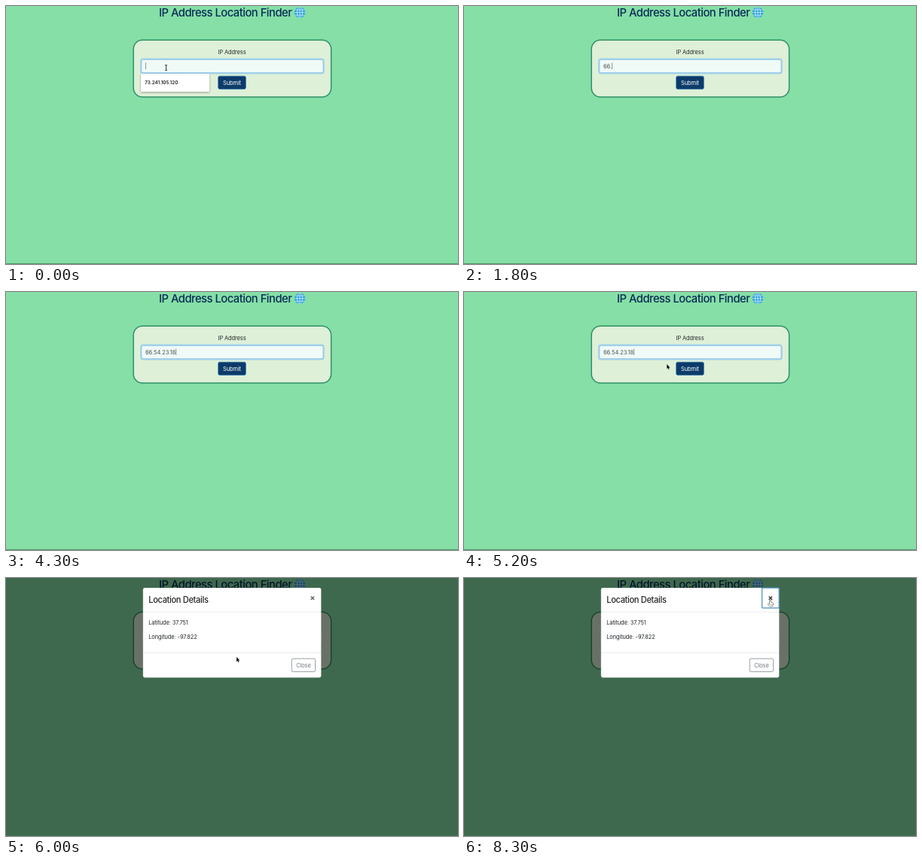
An HTML page with a canvas for the animation above (8400 ms loop, 600 px wide and 343 px high).

```html
<!DOCTYPE html>
<html lang="en">
<head>
<meta charset="utf-8">
<title>IP Address Location Finder</title>
<style>
  html, body { margin: 0; width: 100%; height: 100%; overflow: hidden; background: #85dfa6; }
  canvas { display: block; width: 600px; height: 343px; }
</style>
</head>
<body>
<canvas id="stage"></canvas>
<script>
const W = 600, H = 343, LOOP = 8400, STEP = 100;
const canvas = document.getElementById('stage');
const ctx = canvas.getContext('2d');
const ratio = window.devicePixelRatio || 1;
canvas.width = Math.round(W * ratio);
canvas.height = Math.round(H * ratio);

const TYPED = '66.54.23.18';
const KEY_TIMES = [1200, 1400, 1700, 2800, 2900, 3100, 3300, 3500, 3700, 3900, 4100];
const MOUSE_BACK = 4800, PRESS = 5800, OPEN = 6000, CLOSE_PRESS = 8100;

// Mouse waypoints: time, x, y
const PATH = [
  [0, 212.5, 82], [MOUSE_BACK, 212.5, 82], [5500, 306, 105],
  [7000, 306, 105], [7800, 406.5, 29.5]
];

function mouseAt(t) {
  for (let i = 1; i < PATH.length; i++) {
    const [t0, x0, y0] = PATH[i - 1], [t1, x1, y1] = PATH[i];
    if (t < t1) {
      const p = (t - t0) / (t1 - t0), e = p * p * (3 - 2 * p);
      return { x: x0 + (x1 - x0) * e, y: y0 + (y1 - y0) * e };
    }
  }
  const [, x, y] = PATH[PATH.length - 1];
  return { x, y };
}

function box(x, y, w, h, r, fill, stroke, line = 1) {
  ctx.beginPath();
  ctx.roundRect(x, y, w, h, r);
  if (fill) { ctx.fillStyle = fill; ctx.fill(); }
  if (stroke) { ctx.strokeStyle = stroke; ctx.lineWidth = line; ctx.stroke(); }
}

function text(str, x, y, { size = 7.4, weight = 400, color = '#212529', align = 'left', track = -0.07 } = {}) {
  ctx.font = `${weight} ${size}px Inter, "Liberation Sans", sans-serif`;
  ctx.letterSpacing = `${track}px`;
  ctx.textAlign = align;
  ctx.fillStyle = color;
  ctx.fillText(str, x, y);
  return ctx.measureText(str).width;
}

function line(x0, y0, x1, y1, color, width) {
  ctx.beginPath();
  ctx.moveTo(x0, y0);
  ctx.lineTo(x1, y1);
  ctx.strokeStyle = color;
  ctx.lineWidth = width;
  ctx.stroke();
}

function globe(x, y, r) {
  ctx.save();
  ctx.beginPath();
  ctx.arc(x, y, r, 0, 2 * Math.PI);
  ctx.fillStyle = '#2f9fdc';
  ctx.fill();
  ctx.clip();
  ctx.strokeStyle = '#d5f1fc';
  ctx.lineWidth = 0.8;
  ctx.beginPath();
  ctx.ellipse(x, y, r * 0.5, r, 0, 0, 2 * Math.PI);
  ctx.moveTo(x, y - r);
  ctx.lineTo(x, y + r);
  for (const k of [-0.5, 0, 0.5]) {
    ctx.moveTo(x - r, y + k * r);
    ctx.lineTo(x + r, y + k * r);
  }
  ctx.stroke();
  ctx.restore();
}

function shape(points, x, y, fill, stroke, width) {
  ctx.beginPath();
  points.forEach(([dx, dy]) => ctx.lineTo(x + dx, y + dy));
  ctx.closePath();
  ctx.lineJoin = 'round';
  ctx.strokeStyle = stroke;
  ctx.lineWidth = width;
  ctx.stroke();
  ctx.fillStyle = fill;
  ctx.fill();
}

const ARROW = [[0, 0], [0, 6.4], [1.5, 5.1], [2.5, 7.3], [3.5, 6.8], [2.5, 4.7], [4.4, 4.6]];
const HAND = [[-0.7, 0.4], [0, 0], [0.7, 0.4], [0.8, 2.8], [3.1, 3.3], [3.7, 4],
  [3.5, 6.2], [2.8, 8.2], [-0.8, 8.2], [-2.8, 5.2], [-2.4, 4.5], [-0.7, 5.6]];

const cursors = {
  arrow: (x, y) => shape(ARROW, x, y, '#111', '#fff', 1),
  hand: (x, y) => {
    shape(HAND, x, y, '#fff', '#222', 1);
    for (const dx of [0.4, 1.5, 2.5]) line(x + dx, y + 5, x + dx, y + 7, '#555', 0.4);
  },
  beam: (x, y) => {
    line(x, y - 3, x, y + 3, '#222', 0.9);
    for (const dy of [-3.4, 3.4]) line(x - 1.6, y + dy, x + 1.6, y + dy, '#222', 0.8);
  }
};

function inside(m, x, y, w, h) {
  return m.x >= x && m.x <= x + w && m.y >= y && m.y <= y + h;
}

function drawMouse(t) {
  if (t >= KEY_TIMES[0] && t < MOUSE_BACK) return;
  const m = mouseAt(t);
  let kind = 'arrow';
  if (t >= OPEN) {
    if (inside(m, 396, 13, 22, 27)) kind = 'hand';
  } else if (inside(m, 180, 71, 241, 18)) {
    kind = 'beam';
  } else if (inside(m, 281, 93, 38, 18)) {
    kind = 'hand';
  }
  cursors[kind](m.x, m.y);
}

function drawInput(t) {
  const focused = t < PRESS;
  if (focused) {
    box(179.2, 70.7, 242.4, 18.6, 2.5, null, '#a5d3e8', 2.2);
    box(179.8, 71.3, 241.2, 17.4, 2, '#f0faf6', '#80bdee', 0.8);
  } else {
    box(180, 71.4, 240.8, 17.2, 2, '#f0faf6', '#c9d8d0', 0.6);
  }
  const count = KEY_TIMES.filter(k => k <= t).length;
  const width = text(TYPED.slice(0, count), 185, 82.6, { size: 7.5, color: '#495057', track: -0.03 });
  const since = t - (count ? KEY_TIMES[count - 1] : 0);
  if (focused && since % 1000 < 500) {
    const x = 185.5 + width;
    line(x, 75.5, x, 84, '#495057', 0.6);
  }
}

function drawSubmit(t) {
  if (t >= PRESS) box(280.9, 92.4, 38.2, 18.8, 2.6, null, '#5aa9ea', 1.8);
  box(281.7, 93.2, 36.6, 17.2, 2, '#0c3b69', '#1565b0', 0.6);
  text('Submit', 300, 104.5, { color: '#fff', align: 'center' });
}

function drawSuggestion() {
  ctx.save();
  ctx.shadowColor = 'rgba(0,0,0,0.35)';
  ctx.shadowBlur = 3 * ratio;
  ctx.shadowOffsetY = ratio;
  box(179, 90, 91, 24, 1, '#fff');
  ctx.restore();
  text('73.241.105.120', 184.3, 104, { size: 6.3, weight: 600, color: '#222', track: 0 });
}

function drawPage(t) {
  ctx.fillStyle = '#85dfa6';
  ctx.fillRect(0, 0, W, H);
  text('IP Address Location Finder', 203, 14, { size: 14.75, weight: 500, color: '#0b2b57', track: -0.5 });
  globe(390, 8.6, 7.2);
  box(169.2, 45.2, 262.4, 75.8, 12, '#def0d7', '#2f9068', 1.5);
  text('IP Address', 300, 64.2, { align: 'center' });
  drawInput(t);
  drawSubmit(t);
  if (t < KEY_TIMES[0]) drawSuggestion();
}

function drawModal(t) {
  ctx.fillStyle = 'rgba(0,0,0,0.525)';
  ctx.fillRect(0, 0, W, H);
  box(181.8, 13, 236.6, 119.4, 2.4, '#fff', 'rgba(0,0,0,0.2)', 0.5);
  text('Location Details', 189.2, 33.4, { size: 11.05, weight: 500, track: -0.32 });
  line(182, 45.2, 418, 45.2, '#dee2e6', 0.7);
  text('Latitude: 37.751', 189.2, 61.8);
  text('Longitude: -97.822', 189.2, 80.8);
  line(182, 99.2, 418, 99.2, '#dee2e6', 0.7);
  box(379.2, 107.2, 31.4, 17.4, 2, '#fff', '#6c757d', 0.7);
  text('Close', 394.9, 118.6, { color: '#6c757d', align: 'center' });

  const hover = inside(mouseAt(t), 396, 13, 22, 27);
  const cross = hover ? '#333' : '#666';
  line(404.7, 24.6, 409.1, 29, cross, 1.4);
  line(409.1, 24.6, 404.7, 29, cross, 1.4);
  if (t >= CLOSE_PRESS) box(395.6, 13.2, 22.6, 26.6, 0.8, null, '#4a90bd', 1.2);
}

function draw(t) {
  ctx.setTransform(ratio, 0, 0, ratio, 0, 0);
  drawPage(t);
  if (t >= OPEN) drawModal(t);
  line(0, 342.6, W, 342.6, '#3f7d5a', 0.8);
  drawMouse(t);
}

function tick() {
  const t = performance.now() % LOOP;
  draw(Math.floor(t / STEP) * STEP);
  requestAnimationFrame(tick);
}
tick();
</script>
</body>
</html>
```
